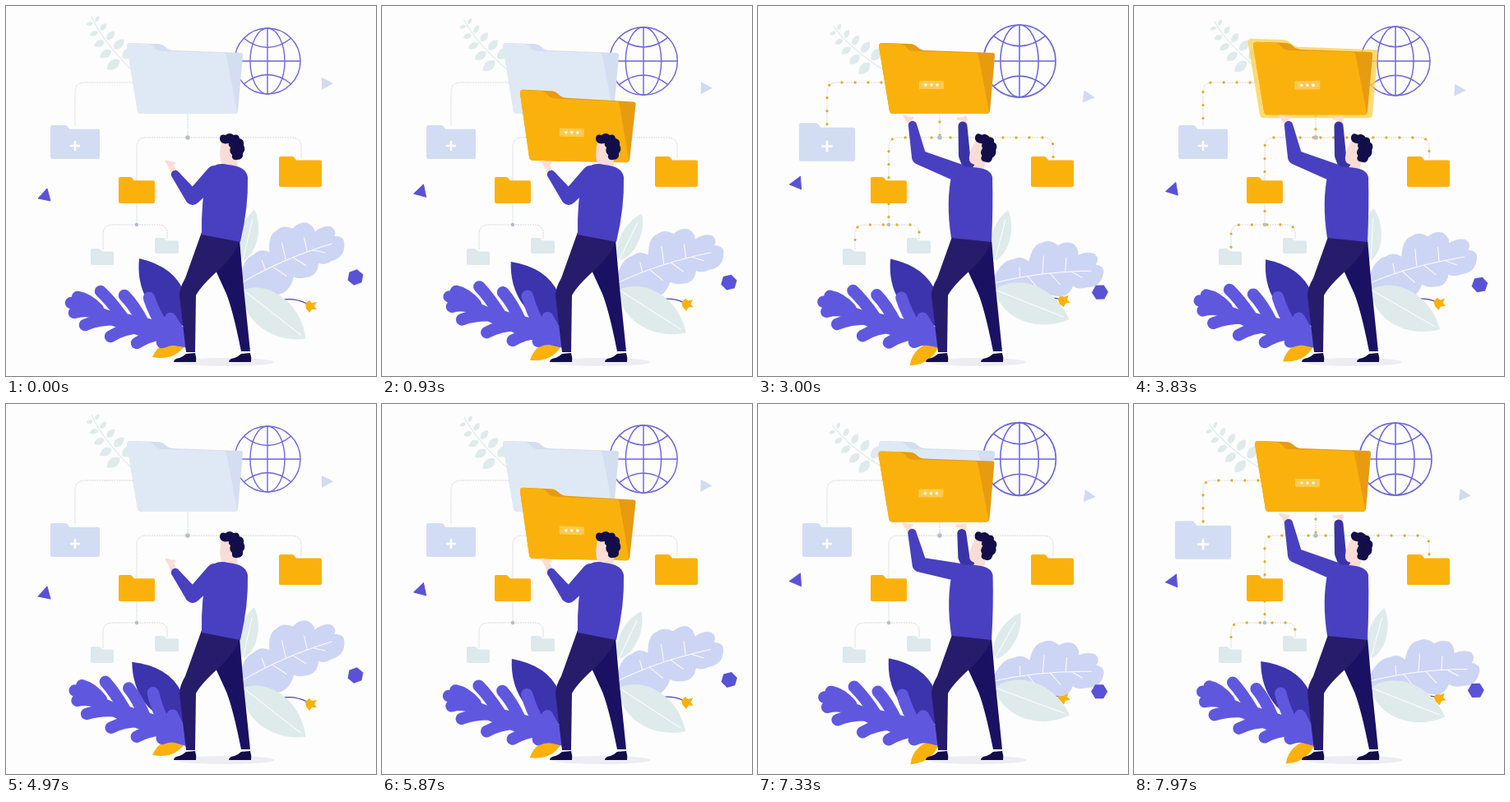
An HTML page for the animation above (8000 ms loop, 450 by 450 pixels).

```html
<!DOCTYPE html>
<html lang="en">
<head>
<meta charset="utf-8">
<title>Folder tree</title>
<style>
html, body { margin: 0; width: 100%; height: 100%; overflow: hidden; background: #fdfdfd; }
svg { display: block; width: 100vw; height: 100vh; }
.line { fill: none; stroke: #d3d8de; stroke-width: 1; stroke-dasharray: 2 1; }
.flow { fill: none; stroke: #dcb02c; stroke-width: 3.3; stroke-linecap: round; stroke-dasharray: 0 16; }
.globe { fill: none; stroke: #6d66d8; stroke-width: 1.4; }
.fern { fill: none; stroke: #5f58de; stroke-width: 14.5; stroke-linecap: round; }
.vein { fill: none; stroke: #fdfdfd; stroke-width: 1; }
.green { fill: #deebea; }
.skin { fill: #fadcd6; }
.hair { fill: #130d4a; }
.sleeve { fill: #4840c0; }
</style>
</head>
<body>
<svg viewBox="0 0 450 450">
  <defs>
    <path id="back" d="M147 49Q147 45 151 45L184 46Q190 46 194 50Q198 54 204 54L285 57Q288 57 288 60L282 128Q281 131 278 131H164Q161 131 160 128Z"/>
    <path id="front" d="M147 49Q147 45 151 45L170 46Q177 46 181 51Q184 55 190 55L264 57Q267 57 268 60L281 128Q281 131 278 131H164Q161 131 160 128Z"/>
    <g id="tree">
      <path d="M160 93H96Q84 93 84 105V146"/>
      <path d="M221 131V160H347Q359 160 359 172V185"/>
      <path d="M221 160H171Q159 160 159 172V266H130Q118 266 118 278V297"/>
      <path d="M159 266H185Q196 266 196 277V284"/>
    </g>
  </defs>

  <g id="sprig" class="green"></g>
  <g id="globe" class="globe">
    <circle r="40"/><ellipse rx="21" ry="40"/>
    <path d="M0-40V40M-40 0H40M-29-28Q0-5 29-28M-29 28Q0 5 29 28"/>
  </g>
  <g id="triL"><path d="M3-8L7 7-8 4Z" fill="#5a52d6" stroke="#5a52d6" stroke-linejoin="round"/></g>
  <g id="triR"><path d="M-6-7L8 0-6 8Z" fill="#d3daf0"/></g>

  <use href="#tree" class="line"/>
  <use href="#tree" class="flow" id="flow"/>
  <g fill="#b9bccb"><circle cx="221" cy="160" r="2.8"/><circle cx="159" cy="266" r="2.3"/></g>
  <g id="small"></g>

  <use href="#back" fill="#d3def0"/>
  <use href="#front" fill="#dfe9f5"/>

  <g id="stalk"><path class="leafTop green"/><path class="vein" d="M0 0H52"/></g>
  <g id="flower">
    <path d="M338 357Q352 355 366 362" fill="none" stroke="#4b44b4" stroke-width="1.3"/>
    <path d="M364 362L369 358 372 361 378 360 375 365 378 369 372 369 369 373 365 368Z" fill="#fbb10c"/>
  </g>
  <g id="wavy">
    <path fill="#cdd5f5" d="M284 342Q285 308 301 302Q309 294 320 299Q318 278 328 273Q336 265 348 270Q357 261 366 263Q374 267 375 274Q384 266 394 267Q402 271 399 279Q411 278 411 288Q412 305 396 309Q387 315 380 312Q379 327 367 329Q356 332 350 329Q345 349 329 351Q304 353 284 342Z"/>
    <path class="vein" d="M286 337Q335 307 396 288M315 320L311 309M340 308L335 287M366 298L362 281M323 316L341 328M348 305L365 315M373 296L388 299"/>
  </g>
  <g id="broad"><path class="leafLow green"/><path class="vein" d="M0 0H90"/></g>

  <g id="dark"><path fill="#3b34ac" d="M162 307Q205 317 217 349Q222 368 218 390Q185 380 172 358Q159 336 162 307Z"/></g>
  <g id="gold"><path fill="#fbb10c" d="M222 406Q188 403 178 427Q208 433 222 406Z"/></g>
  <g id="fern" class="fern">
    <path d="M212 404Q150 388 79 361"/>
    <path fill="#5f58de" stroke="none" d="M222 416Q150 404 78 364Q150 372 222 392Z"/>
    <path d="M112 369Q100 356 87 354M142 379Q127 358 115 347M168 387Q156 364 144 352M194 395Q180 374 174 355M213 401Q206 390 200 380"/>
    <path d="M112 373Q94 369 83 373M135 381Q112 381 96 388M163 391Q143 392 127 402M189 399Q173 401 159 410M211 406Q200 404 190 409"/>
  </g>
  <g id="hex"><path fill="#5a52d6" d="M-10 0L-5-8.5H5L10 0 5 8.5H-5Z"/></g>

  <ellipse cx="266" cy="433" rx="60" ry="5" fill="#ececf2"/>
  <g id="folder">
    <use href="#back" id="halo" fill="#ffcf4a"/>
    <use href="#back" fill="#e79b10"/>
    <use href="#front" fill="#fbb10c"/>
    <rect x="196" y="91" width="30" height="10" rx="1" fill="#fcca52"/>
    <g fill="#fffaf0"><circle cx="204" cy="96" r="1.8"/><circle cx="211" cy="96" r="1.8"/><circle cx="218" cy="96" r="1.8"/></g>
  </g>
  <path id="handR" class="skin"/>
  <path id="armR" fill="#3a33a8"/>
  <path fill="#1a1162" d="M250 290L284 284Q287 320 289 342L297 420H286Q276 370 268 350Q258 328 252 315Z"/>
  <path fill="#271b6c" d="M238 275L284 285Q280 300 263 317Q237 340 231 352L230 421H219L211 352Q211 343 218 331Z"/>
  <g class="hair">
    <path id="shoe" d="M219 423L230 422Q232 428 231 433H204Q204 429 211 428Q216 426 219 423Z"/>
    <use href="#shoe" x="67"/>
  </g>
  <g id="head">
    <path class="skin" d="M262 166Q259 179 261 188Q263 195 270 194L268 201Q276 207 282 199L281 168Z"/>
    <path class="hair" d="M260 162Q260 155 267 157Q272 153 277 157Q283 155 284 161Q290 162 289 169Q292 175 288 179Q289 187 281 187Q274 188 275 181Q271 178 273 172Q270 170 271 167Q261 169 260 162Z"/>
  </g>
  <path id="handL" class="skin"/>
  <path id="torso" class="sleeve"/>
  <path id="armL" class="sleeve"/>
</svg>
<script>
const LOOP = 8000, CYCLE = 5000, SWAY = 10000 / 3;
const $ = id => document.getElementById(id);
const set = (id, name, value) => $(id).setAttribute(name, value);
const move = (id, value) => set(id, 'transform', value);
const clamp = x => Math.min(1, Math.max(0, x));
const smooth = x => (x = clamp(x), x * x * (3 - 2 * x));
const ramp = (t, a, b) => smooth((t - a) / (b - a));
const bump = (t, mid, half) => smooth(1 - Math.abs(t - mid) / half);
const wave = (t, period) => (1 - Math.cos(2 * Math.PI * t / period)) / 2;
const mix = (a, b, k) => a + (b - a) * k;

const leaf = (len, w) => `M0 0C${len * .2} ${-w} ${len * .7} ${-w} ${len} 0C${len * .7} ${w} ${len * .2} ${w} 0 0Z`;
document.querySelector('.leafTop').setAttribute('d', leaf(64, 15));
document.querySelector('.leafLow').setAttribute('d', leaf(97, 30));

// Sprig: leaf pairs growing along a curved stem
(function buildSprig() {
  let out = '<path d="M104 13Q118 44 153 78" fill="none" stroke="#deebea" stroke-width="1.2"/>';
  for (let i = 0; i < 5; i++) {
    const k = .12 + i * .17, q = 1 - k;
    const x = q * q * 104 + 2 * q * k * 118 + k * k * 153;
    const y = q * q * 13 + 2 * q * k * 44 + k * k * 78;
    const len = 8 + i * 2.8;
    for (const a of [-55 + i * 4, 168 - i * 6])
      out += `<path d="${leaf(len, len * .38)}" transform="translate(${x} ${y}) rotate(${a}) translate(2 0)"/>`;
  }
  $('sprig').innerHTML = out;
})();

// x, y, width, height, colour, pulse time
const SMALL = [
  [54, 145, 60, 41, '#d2ddf3', 2980],
  [137, 208, 44, 32, '#fbb10c', 3230],
  [332, 183, 52, 37, '#fbb10c', 3330],
  [103, 295, 28, 20, '#dde9ec', 3480],
  [181, 282, 29, 19, '#dde9ec', 3480]
];
$('small').innerHTML = SMALL.map(([x, y, w, h, c], i) =>
  `<g id="s${i}"><path fill="${c}" d="M${x} ${y + 2}q0-2 2-2h${w * .27}q2 0 3 2l2 ${h * .07}H${x + w - 2}q2 0 2 2V${y + h - 2}q0 2-2 2H${x + 2}q-2 0-2-2Z"/>` +
  (i ? '' : '<path d="M84 164v12M78 170h12" stroke="#fdfdfd" stroke-width="2.4"/>') + '</g>').join('');

// Poses from reaching to lifted, at progress STEPS
const STEPS = [0, .33, .64, 1];
const POSE = {
  lean: [0, .35, .9, 1],
  shoulder: [[254, 205], [251, 206], [245, 206], [244, 203]],
  elbow: [[227, 233], [206, 219], [197, 203], [196, 184]],
  cuff: [[206, 205], [195, 188], [187, 165], [188, 145]],
  hand: [[199, 192], [187, 176], [180, 156], [182, 137]],
  elbowR: [[274, 220], [260, 212], [250, 190], [251, 182]],
  cuffR: [[276, 205], [255, 188], [247, 165], [249, 146]],
  handR: [[274, 195], [254, 179], [250, 156], [252, 137]],
  folder: [[20, 58], [7, 40], [-1, 21], [0, 0]],
  tilt: [1.2, .9, 0, 0]
};
function pose(name, p) {
  let i = 0;
  while (i < 2 && p > STEPS[i + 1]) i++;
  const k = (p - STEPS[i]) / (STEPS[i + 1] - STEPS[i]), a = POSE[name][i], b = POSE[name][i + 1];
  return a.length ? a.map((v, j) => mix(v, b[j], k)) : mix(a, b, k);
}

// Tapered limb: round joints linked by quads
function limb(points, radii) {
  let d = '';
  points.forEach(([x, y], i) => {
    const r = radii[i];
    d += `M${x - r} ${y}a${r} ${r} 0 1 0 ${2 * r} 0a${r} ${r} 0 1 0 ${-2 * r} 0Z`;
    if (!i) return;
    const [u, v] = points[i - 1], s = radii[i - 1], len = Math.hypot(x - u, y - v) || 1;
    const nx = (v - y) / len, ny = (x - u) / len;
    d += `M${u + nx * s} ${v + ny * s}L${x + nx * r} ${y + ny * r} ${x - nx * r} ${y - ny * r} ${u - nx * s} ${v - ny * s}Z`;
  });
  return d;
}

function drawMan(p) {
  const lean = pose('lean', p), a = -9 * lean;
  const shoulder = pose('shoulder', p), cuff = pose('cuff', p), hand = pose('hand', p);
  const cuffR = pose('cuffR', p), handR = pose('handR', p);
  set('torso', 'd', `M${245 + a} ${202 + lean}Q${254 + a} ${189 + 5 * lean} ${270 + a} ${193 + 3 * lean}Q${292 + a} ${195 + 2 * lean} ${294 + a} 208Q${295 + a} 245 ${285 - lean} 287L${238 - 3 * lean} ${278 + 4 * lean}Q${237 + a} 238 ${245 + a} ${202 + lean}Z`);
  set('armL', 'd', limb([shoulder, pose('elbow', p), cuff], [11, 9, 5.2]));
  set('handL', 'd', limb([cuff, hand], [4, 3]) + limb([hand, [hand[0] - 4, hand[1] - 3]], [3, 1.5]) + limb([hand, [hand[0] + 6, hand[1] - 1]], [2.5, 1.5]));
  set('armR', 'd', limb([[265 + a / 2, 204], pose('elbowR', p), cuffR], [8, 7, 5.5]));
  set('handR', 'd', limb([cuffR, handR], [4, 3]) + limb([handR, [handR[0] - 9, handR[1]]], [2.5, 1.5]));
  move('head', `translate(${-3 * lean} ${lean}) rotate(${18 * lean} 275 182)`);
}

function drawFolder(c, p) {
  const [x, y] = pose('folder', p), pulse = bump(c, 3800, 550);
  move('folder', `translate(${x} ${y}) rotate(${pose('tilt', p)} 217 88) translate(217 88) scale(${1 + .03 * pulse}) translate(-217 -88)`);
  const shown = ramp(c, 0, 900) * (1 - ramp(c, 4250, 4750)) * (1 - .2 * bump(c, 1700, 330));
  set('folder', 'opacity', shown);
  move('halo', `translate(217 88) scale(${1 + .09 * pulse}) translate(-217 -88)`);
  set('halo', 'opacity', .75 * pulse);
}

function drawScene(t, c) {
  const s = wave(c, CYCLE), a = wave(t, SWAY);
  const stalk = c < 1900 || c > 3800
    ? mix(3, 33, smooth(((c + 1200) % CYCLE) / 3100))
    : mix(33, 3, ramp(c, 1900, 3800));
  move('globe', `translate(318 67) scale(${1 + .11 * s})`);
  move('sprig', `rotate(${-13 * s} 152 80)`);
  move('triL', `translate(47 ${230 - 17 * s}) rotate(${12 * s})`);
  move('triR', `translate(${390 + 13 * s} ${94 + 18 * s}) rotate(${8 * s})`);
  move('hex', `translate(${425 - 10 * s} ${330 + 20 * s}) rotate(${-20 + 20 * s})`);
  move('stalk', `translate(288 310) rotate(${stalk - 90})`);
  move('flower', `rotate(${-14 * s} 340 357)`);
  move('wavy', `rotate(${.5 + 18 * s} 285 337)`);
  move('broad', `translate(288 345) rotate(${38 - 18 * s})`);
  move('gold', `rotate(${-16 * s} 222 406)`);
  move('dark', `rotate(${-6.5 * a} 218 387)`);
  move('fern', `rotate(${5.4 * a} 215 405)`);
  set('flow', 'opacity', ramp(c, 2350, 2800) * (1 - ramp(c, 4350, 5020)));
  set('flow', 'stroke-dashoffset', -c * .03);
  SMALL.forEach(([x, y, w, h, , at], i) => {
    const cx = x + w / 2, cy = y + h / 2;
    move('s' + i, `translate(${cx} ${cy}) scale(${1 + .14 * bump(c, at, 250)}) translate(${-cx} ${-cy})`);
  });
}

function draw(now) {
  const t = now % LOOP, c = t % CYCLE, p = ramp(c, 1000, 2900);
  drawScene(t, c);
  drawFolder(c, p);
  drawMan(p * (1 - ramp(c, 4250, 4880)));
}

let start;
function tick(now) {
  start ??= now;
  draw(now - start);
  requestAnimationFrame(tick);
}
draw(0);
requestAnimationFrame(tick);
</script>
</body>
</html>
```
